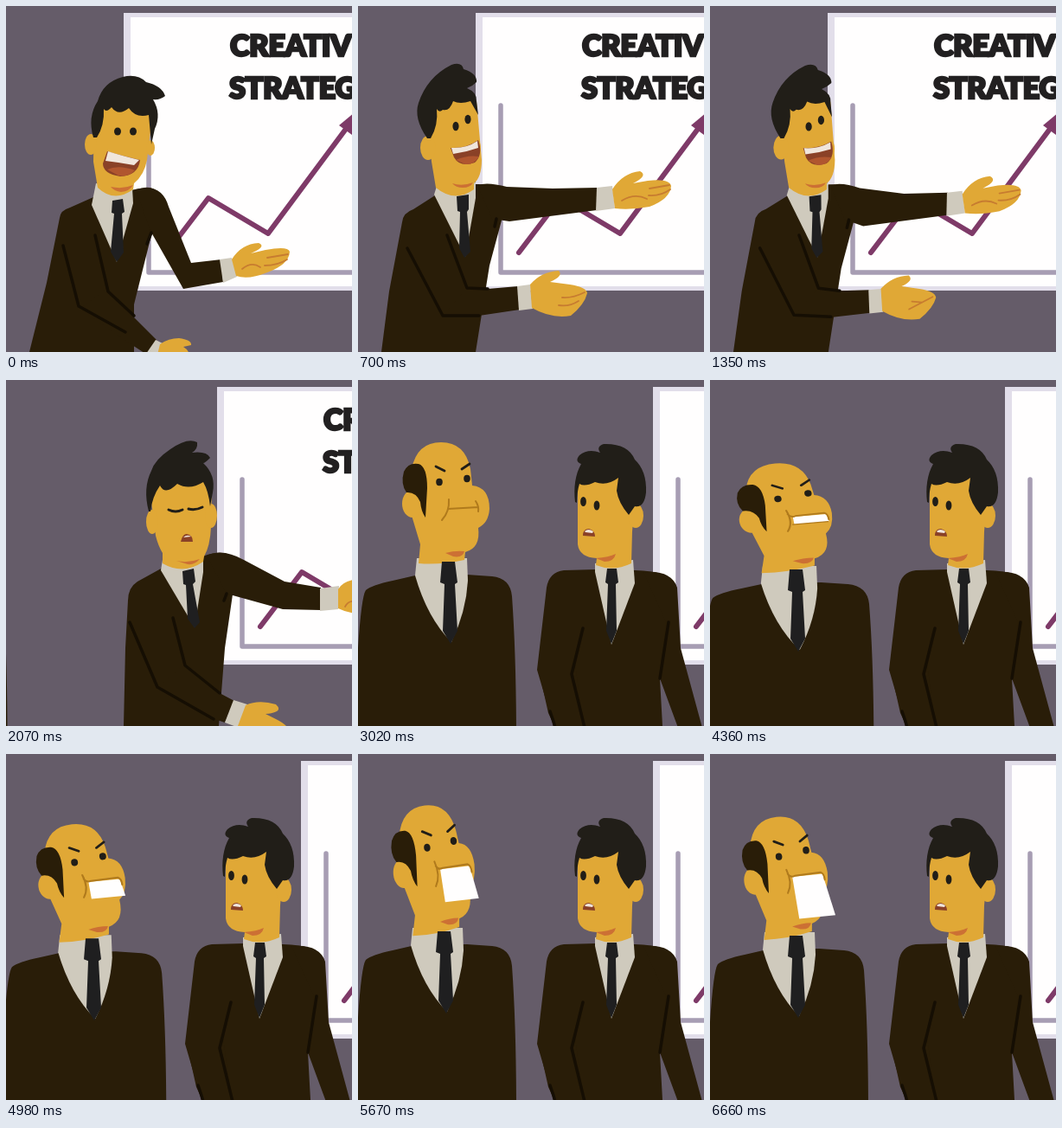
An HTML page with a canvas that plays this animation: 400x400 px, repeating every 7.72 s.

```html
<!DOCTYPE html>
<html lang="en">
<head>
<meta charset="utf-8">
<title>Creative strategy</title>
<style>
html, body { margin: 0; width: 100%; height: 100%; overflow: hidden; background: #655c69; }
canvas { display: block; width: 400px; height: 400px; }
</style>
</head>
<body>
<canvas id="stage" width="400" height="400"></canvas>
<script>
const ctx = document.getElementById('stage').getContext('2d');
const LOOP = 7720, STEPS = 120;
const SKIN = '#e0a836', COAT = '#291d08', FOLD = '#150e03', HAIR = '#211e18',
  SHIRT = '#cfcabd', TIE = '#1f1f20', LIP = '#8a4127', WHITE = '#fffefe',
  TEETH = '#f0e6dc', SHADE = '#cc7034', CREASE = '#b07a1c';

const lerp = (a, b, k) => a + (b - a) * k;

// Piecewise linear value from [step, value] pairs.
function key(n, pts) {
  if (n <= pts[0][0]) return pts[0][1];
  for (let i = 1; i < pts.length; i++) {
    const [a, u] = pts[i - 1], [b, v] = pts[i];
    if (n <= b) return lerp(u, v, (n - a) / (b - a));
  }
  return pts[pts.length - 1][1];
}

// Blends two path strings that share the same commands.
const NUM = /-?\d+(\.\d+)?/g;
function mix(a, b, k) {
  if (k <= 0) return a;
  if (k >= 1) return b;
  const to = b.match(NUM);
  let i = 0;
  return a.replace(NUM, v => +lerp(+v, +to[i++], k).toFixed(2));
}

const oval = (x, y, rx, ry) =>
  `M${x - rx} ${y}A${rx} ${ry} 0 1 1 ${x + rx} ${y}A${rx} ${ry} 0 1 1 ${x - rx} ${y}Z`;

function fill(d, color) {
  ctx.fillStyle = color;
  ctx.fill(new Path2D(d));
}

function line(d, color, width) {
  ctx.strokeStyle = color;
  ctx.lineWidth = width;
  ctx.stroke(new Path2D(d));
}

// Presenter body: talking low, arms wide, turning away, standing.
const BODY = {
  torso: [
    'M27 400L47 320L62 245Q63 236 74 233L101 221L160 210Q178 208 180 230L168 265L148 345L148 400Z',
    'M27 400L36 330L51 250Q52 239 64 235L89 219L136 206Q150 205 160 212L166 248L152 300L136 400Z',
    'M136 400L138 310L141 255Q141 240 152 233L181 217L230 203Q250 196 262 204L262 248L253 310L246 400Z',
    'M226 400L207 335L218 240Q221 222 238 220L275 219L320 220Q362 221 368 238L366 290L349 345L352 400Z'],
  shirt: [
    'M104 205L146 210L147 228L128 296L99 230Z',
    'M92 205L136 204L136 222L124 290L88 218Z',
    'M181 208L228 203L228 222L218 286L179 220Z',
    'M274 212L318 208L320 235L293 306L274 222Z'],
  tie: [
    'M123 225L135 223L137 238L134 240L136 285L128 296L121 284L125 240L122 239Z',
    'M114 220L128 218L128 235L126 238L130 284L123 291L117 280L118 238L115 237Z',
    'M204 221L217 218L219 233L216 236L224 280L218 287L210 276L208 237L205 236Z',
    'M288 218L299 218L301 234L298 236L299 290L293 305L287 290L289 236L286 234Z'],
  foreArm: [
    'M118 325L148 360L174 386L163 403L135 385L85 350Z',
    'M126 326L150 327L185 324L187 351L140 358L98 358Z',
    'M207 328L247 362L264 371L253 396L235 390L175 355Z',
    'M250 320L258 380L262 402L228 402L220 385L210 340Z'],
  folds: [
    'M66 277L84 347L138 377M103 265L118 330L148 358M168 262L163 275',
    'M57 280L98 358L140 358M103 265L126 326L150 327M160 246L158 255',
    'M143 280L175 355L240 392M193 275L207 330L247 362M255 247L252 255',
    'M222 383L226 395L228 402M260 287L247 340L262 402M359 280L349 345'],
  nearCuff: [
    'M173 386L185 392L177 405L162 402Z',
    'M184 324L199 322L202 350L186 352Z',
    'M263 370L279 375L269 402L253 396Z',
    'M262 402L262 420L230 420L228 402Z'],
  nearHand: [
    'M178 391Q188 384 200 384Q215 386 214 392L205 394Q212 398 212 405Q205 412 195 412Q185 410 175 403Z',
    'M199 322Q212 307 232 306Q238 312 222 319L245 322Q264 325 265 332Q262 345 246 358Q224 362 201 349Z',
    'M277 376Q292 369 312 375Q322 384 300 386L312 392Q328 400 328 408Q320 415 300 412Q280 410 268 400Z',
    'M262 420Q262 430 260 440Q258 442 256 444L254 450Q250 460 245 460Q240 450 235 440Q232 430 230 420Z'],
  nearLines: [
    'M200 402L212 404M196 406L206 410',
    'M236 337Q248 338 262 331M232 346Q244 348 255 341',
    'M300 402L326 406M296 408L312 412',
    'M250 450L252 455M246 452L247 458'],
  farArm: [
    'M150 212Q180 204 188 232L214 297L249 293L251 319L205 327L167 260Z',
    'M138 207Q150 203 172 209L225 211L277 210L276 236L175 249L155 246Z',
    'M232 203Q250 194 275 208L322 233L364 240L364 266L320 265L255 247Z',
    'M330 222Q362 219 369 240L373 310L398 402L370 402L349 345L356 280Z'],
  farCuff: [
    'M247 293L261 291L267 313L251 320Z',
    'M276 210L294 208L297 234L275 237Z',
    'M363 241L385 238L384 265L363 267Z',
    'M398 402L396 420L368 420L370 402Z'],
  farHand: [
    'M261 293Q272 275 292 274Q302 278 283 286L300 282Q326 277 328 284Q327 299 302 308Q280 317 266 312Z',
    'M294 212Q306 193 326 191Q336 196 318 205L335 202Q360 199 362 208Q361 223 337 232Q315 236 297 234Z',
    'M384 242Q390 231 410 230Q420 232 405 240L425 238Q450 236 452 245Q450 260 420 270Q400 272 384 264Z',
    'M396 420Q400 430 400 440Q400 450 396 450L396 455Q396 470 390 470Q380 470 375 450Q370 440 368 420Z'],
  farLines: [
    'M273 304Q284 295 294 302M299 300Q314 300 325 293M302 291L326 287',
    'M305 225Q320 216 334 223M336 219Q350 220 361 212M337 211L360 207',
    'M392 262Q397 252 410 258M425 256Q438 257 450 250M428 248L450 244',
    'M380 450Q385 445 390 450M390 455Q392 460 394 455M390 460L394 462']
};

// Laughing head in its two tilts.
const LAUGH = [
  ['M102 120L101 180L106 210Q125 228 147 212L148 205Q160 195 163 178L170 120Q140 95 102 120Z',
   'M80 125L85 180L90 210Q112 228 134 212L134 205Q143 198 143 178L137 110Q105 95 80 125Z', SKIN],
  [oval(98, 160, 7, 12), oval(81, 164, 9, 14), SKIN],
  [oval(167, 164, 5, 9), oval(139, 165, 3, 8), SKIN],
  ['M121 209Q135 212 147 207Q143 214 133 215Q125 214 121 209Z',
   'M109 205Q120 209 133 204Q130 210 121 210Q113 210 109 205Z', SHADE],
  ['M101 152Q94 128 106 110Q112 88 135 82Q152 78 162 88Q180 92 184 104Q178 109 170 108Q180 125 172 142L168 160L165 126Q150 130 142 118Q130 128 122 117Q116 124 113 119Q114 138 105 152Z',
   'M80 153Q64 130 70 112Q80 82 108 68Q120 64 122 73Q138 78 137 88Q132 93 126 95Q138 100 137 110L139 126L130 110Q118 114 110 110Q106 122 98 120Q94 124 91 119Q93 138 84 153Z', HAIR],
  [oval(129, 145, 4, 4.5), oval(113, 139, 3.6, 5.2), HAIR],
  [oval(147, 145, 4, 4.5), oval(127, 131, 3.6, 5.2), HAIR],
  ['M117 168Q130 172 155 178Q153 196 132 197Q112 194 112 182Z',
   'M107 164Q125 165 139 155Q145 172 135 181Q118 187 111 175Z', LIP],
  ['M118 168Q130 172 154 178L148 184Q132 181 115 179Z',
   'M108 164Q125 165 138 156L139 164Q125 169 110 171Z', TEETH],
  ['M117 189Q130 183 149 190Q142 198 130 196Z',
   'M113 178Q126 172 140 174Q134 184 124 183Z', '#b0562f']
];

const BLINK = [
  ['M166 125L173 180Q176 192 181 200L181 212Q205 226 228 210L229 204Q236 192 237 170L238 120Q200 100 166 125Z', SKIN],
  [oval(169, 164, 7, 14), SKIN],
  [oval(237, 157, 7, 14), SKIN],
  ['M197 209Q210 212 224 207Q218 214 210 213Z', SHADE],
  ['M165 152Q158 125 168 105Q172 92 190 80Q210 66 221 72Q222 80 215 84Q232 82 236 90Q230 96 228 96Q243 110 239 130L236 146Q234 128 228 118Q212 128 198 120Q184 134 178 122Q169 135 167 152Z', HAIR],
  ['M202 187Q204 178 209 178Q216 179 216 187Z', LIP],
  ['M205 182Q209 178 214 181Z', TEETH]
];

const WORRY = [
  ['M254 120L254 190Q256 205 276 206L275 214Q295 222 316 212L317 175L322 120Q290 95 254 120Z', SKIN],
  [oval(321, 157, 9, 14), SKIN],
  ['M275 206Q290 205 298 201Q296 210 285 210Z', SHADE],
  ['M251 141Q248 115 258 97Q250 94 256 87Q266 79 280 84Q275 77 284 74Q312 73 320 92Q334 105 333 130Q331 148 320 146L313 156Q301 142 299 128L301 113Q288 123 274 118Q262 124 256 120Q253 130 253 142Z', HAIR],
  [oval(260.5, 140.5, 3.4, 5.6), HAIR],
  [oval(276, 145, 3.4, 5.6), HAIR],
  ['M260 180Q260 172 267 172Q274 174 274 181Z', LIP],
  ['M262 175Q266 171 272 175L271 177L263 176Z', TEETH]
];

function drawBoard(cam) {
  ctx.save();
  ctx.translate(cam, 0);
  fill('M136 8H520V329H136Z', '#e2deea');
  fill('M144 13H520V324H144Z', WHITE);
  line('M165 115V308H520', '#a79db3', 5.5);
  line('M186 285L234 222L303 263L396 138', '#7e3a68', 6);
  fill('M385 138L414 114L404 152Z', '#7e3a68');
  ctx.font = '900 34.5px Lato, sans-serif';
  ctx.letterSpacing = '-0.5px';
  ctx.fillStyle = ctx.strokeStyle = '#222021';
  ctx.lineWidth = 2.4;
  ctx.lineJoin = 'miter';
  [['CREATIVE', 259], ['STRATEGY', 258]].forEach(([word, x], i) => {
    ctx.fillText(word, x, 58 + 49 * i);
    ctx.strokeText(word, x, 58 + 49 * i);
  });
  ctx.restore();
}

function drawHead(pose) {
  ctx.save();
  const neck = key(pose, [[1, 112], [2, 205], [3, 296]]);
  if (pose < 1.5) {
    ctx.translate(neck - 112, 0);
    LAUGH.forEach(([a, b, c]) => fill(mix(a, b, pose), c));
  } else if (pose < 2.7) {
    ctx.translate(neck - 205, 0);
    BLINK.forEach(([d, c]) => fill(d, c));
    line('M188 150Q196 154 204 150M211 149Q219 151 227 147', HAIR, 3);
  } else {
    ctx.translate(neck - 296, 0);
    WORRY.forEach(([d, c]) => fill(d, c));
  }
  ctx.restore();
}

function drawPresenter(pose) {
  const i = Math.min(2, Math.floor(pose));
  const part = name => mix(BODY[name][i], BODY[name][i + 1], pose - i);
  fill(part('torso'), COAT);
  fill(part('shirt'), SHIRT);
  drawHead(pose);
  fill(part('tie'), TIE);
  fill(part('foreArm'), COAT);
  fill(part('farArm'), COAT);
  line(part('folds'), FOLD, 3.5);
  for (const side of ['near', 'far']) {
    fill(part(side + 'Cuff'), SHIRT);
    fill(part(side + 'Hand'), SKIN);
    line(part(side + 'Lines'), '#c77c30', 1.8);
  }
}

// stretch: -1 crouched, 1 fully stretched; paper: 0 closed mouth, 1 whole sheet.
function drawBoss(x, stretch, tilt, paper) {
  const open = Math.min(1, paper * 5);
  const wide = 1 - (stretch < 0 ? 0.11 : 0.05) * stretch;
  const lean = tilt * 0.83;
  ctx.save();
  ctx.translate(x, -9 * stretch);

  ctx.save();
  ctx.translate(92, 0);
  ctx.scale(1 - 0.07 * Math.min(0, stretch), 1);
  ctx.translate(-92, 0);
  fill('M-10 420L0 310Q4 250 9 243Q16 237 40 232L66 226L126 225L155 227Q176 229 178 250Q183 320 183 420Z', COAT);
  ctx.translate(lean, 0);
  fill('M68 206L126 206L127 232Q125 268 108 303Q80 275 66 226Z', SHIRT);
  ctx.restore();

  ctx.translate(lean, 0);
  ctx.save();
  ctx.translate(95, 208);
  ctx.scale(wide, 1 + 0.11 * stretch);
  ctx.rotate(tilt * Math.PI / 180);
  ctx.translate(-95, -208);
  fill(mix(
    'M62 103Q68 72 96 72Q124 72 130 103L132 122Q152 124 152 149Q151 165 139 171Q142 194 124 199L123 208Q95 214 70 212L72 190L60 150Z',
    'M62 103Q68 72 96 72Q124 72 130 103L132 117Q147 120 148 142Q148 160 139 168Q142 194 124 199L123 208Q95 214 67 212L72 190L60 150Z',
    open), SKIN);
  fill(oval(63, 143, 12, 16), SKIN);
  fill('M101 200Q112 197 123 198Q121 206 110 204Z', SHADE);
  fill('M53 106Q58 95 70 97Q80 100 80 125L78 159Q73 152 72 141Q67 129 56 130Q49 120 53 106Z', COAT);
  fill(oval(94, 118, 3.8, 4.2), HAIR);
  fill(oval(126, 114, 3.8, 4.2), HAIR);
  line('M90 100L100 105M120 103L129 97', HAIR, 2.8);
  if (paper > 0) {
    const end = 143 + 49 * paper;
    fill(`M107 143L142 143L${142 + 10 * paper} ${end}L${107 + 3 * paper} ${end}Z`, WHITE);
    line('M101 134Q107 150 100 161M102 139Q105 144 110 142L140 141Q144 143 144 150', CREASE, 2);
    if (paper < 0.3) line(`M106 ${end}H143`, CREASE, 1.5);
  } else {
    line('M104 149L139 147M105 138Q106 152 97 162M136 140Q140 146 139 152', CREASE, 2);
  }
  ctx.restore();

  fill('M97 210L112 210L115 234L112 236L115 290L107 305L98 290L100 236L95 234Z', TIE);
  ctx.restore();
}

const POSE = [[1, 0], [2, 0.15], [5, 0.15], [7, 0.4], [9, 0.85], [11, 1], [18, 1], [21, 0.93],
  [28, 0.95], [29, 1.1], [30, 1.35], [31, 1.68], [32, 2], [33, 2.32], [34, 2.58],
  [35, 2.78], [36, 2.9], [38, 3]];
const STRETCH = [[45, 0], [47, 0], [49, 0.15], [51, 0], [58, 0], [62, 0.72], [66, -0.8], [68, -1],
  [69, -1], [71, 0.72], [73, 0.6], [78, -0.6], [82, -1], [83, -1], [86, 1], [88, 0.55],
  [89, 0.55], [94, -0.7], [96, -0.7], [99, 0.72], [103, 0]];
const TILT = [[44, 3], [47, 0], [51, -6]];
const PAPER = [[66, 0], [68, 0.2], [69, 0.2], [71, 0.42], [83, 0.42], [86, 0.74], [96, 0.74], [99, 1]];

function draw(ms) {
  const n = Math.floor((ms % LOOP + 16) / (LOOP / STEPS)) % STEPS;
  const pose = key(n, POSE);
  const cam = key(pose, [[1, 0], [2, 108], [3, 205]]);
  ctx.fillStyle = '#655c69';
  ctx.fillRect(0, 0, 400, 400);
  drawBoard(cam);
  drawPresenter(pose);
  drawBoss((cam - 205) * 1.87, key(n, STRETCH), key(n, TILT), key(n, PAPER));
}

ctx.lineCap = ctx.lineJoin = 'round';
let start;
function tick(now) {
  if (start === undefined) start = now;
  draw(now - start);
  requestAnimationFrame(tick);
}
draw(0);
requestAnimationFrame(tick);
</script>
</body>
</html>
```
